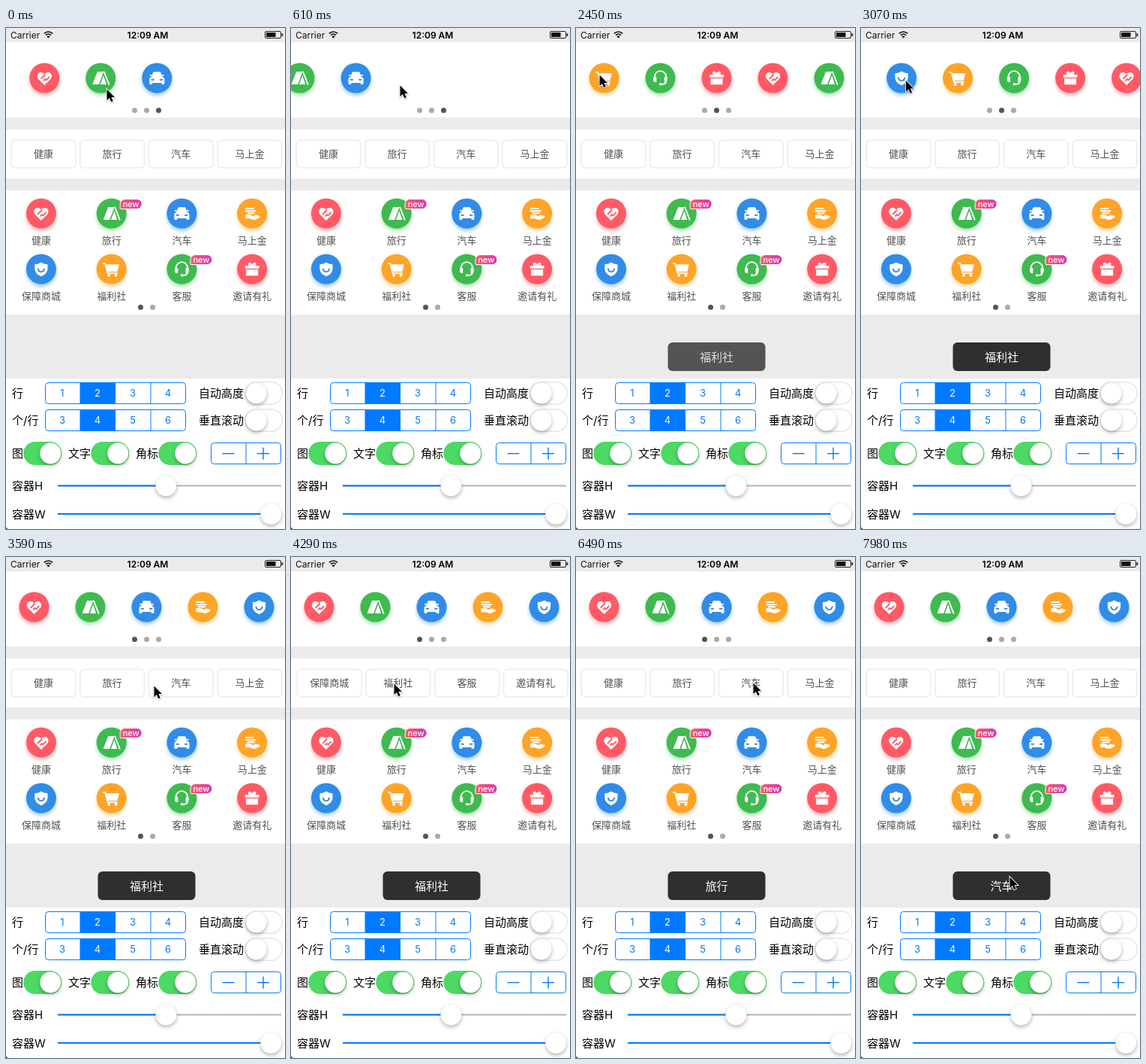
These frames come from a looping animation (372 px wide and 666 px high, 8 s). An HTML page with a canvas:

```html
<!DOCTYPE html>
<html lang="zh">
<head>
<meta charset="utf-8">
<style>
html, body { margin: 0; width: 100%; height: 100%; overflow: hidden; background: #ebebeb; }
canvas { display: block; width: 372px; height: 666px; }
</style>
</head>
<body>
<canvas id="stage"></canvas>
<script>
const W = 372, H = 666, LOOP = 8000, PAGE = 375;
const canvas = document.getElementById('stage');
const dpr = window.devicePixelRatio || 1;
canvas.width = W * dpr;
canvas.height = H * dpr;
const c = canvas.getContext('2d');
const FONT = 'Inter, "Noto Sans CJK SC", "Noto Sans CJK", sans-serif';
const BLUE = '#007aff';
const RED = '#ff5a66', GREEN = '#3fba50', SKY = '#318ce7', ORANGE = '#fda429';

// Each glyph is a list of [path, paint]; paint: w = white fill, k = tint fill, s/t = white/tint stroke
const items = [
  { name: '健康', color: RED, art: [
    ['M0 9.5L-8.3 1.2C-11-2-9.3-7.3-5-7.4C-2.7-7.4-1-6.2 0-4.8C1-6.2 2.7-7.4 5-7.4C9.3-7.3 11-2 8.3 1.2Z', 'w'],
    ['M-4.3 .7L.7-4.2M-1 3.3L.8 1.5L2.5 2.8L6.2-1', 't']] },
  { name: '旅行', color: GREEN, badge: true, art: [
    ['M-11 8.5L-4.4-8.5H3.8L-2.4 8.5Z', 'w'],
    ['M-.6 8.5L3.7-3.5L7.6 8.5Z', 'w'],
    ['M4.6-8L11 8.3', 's']] },
  { name: '汽车', color: SKY, art: [
    ['M-7.2-1.5L-5.2-7.2Q-4.8-8.3-3.6-8.3H3.6Q4.8-8.3 5.2-7.2L7.2-1.5Q10-1 10 1.5V7Q10 8.5 8.5 8.5H7Q6 8.5 6 6.6H-6Q-6 8.5-7 8.5H-8.5Q-10 8.5-10 7V1.5Q-10-1-7.2-1.5Z', 'w'],
    ['M-8.6-3.6H-7.5M7.5-3.6H8.6', 's'],
    ['M-7 2.2H-4.4M4.4 2.2H7', 't']] },
  { name: '马上金', color: ORANGE, art: [
    ['M-8.4-6.5H1.6M-8.4-3.3H4.4M-5.8-.2H2.5', 's'],
    ['M-9 1.4H-3L1.7 3.7Q4 3.3 3.4 1.8L9.7 3.2Q11.4 4.4 9.5 5.7L4.4 8.2Q2.7 8.8 1 8.2L-3.4 6.8H-9Z', 'w']] },
  { name: '保障商城', color: SKY, art: [
    ['M0-9Q3.6-6.4 8.6-6.3V-.3Q8.5 6 0 9.8Q-8.5 6-8.6-.3V-6.3Q-3.6-6.4 0-9Z', 'w'],
    ['M-4.2-.2Q-3.2 3.6 0 3.6Q3.2 3.6 4.2-.2', 't']] },
  { name: '福利社', color: ORANGE, art: [
    ['M-8-6.3H10.2L7.7 3.6H-5.2Z', 'w'],
    ['M-11-7.6H-8.4L-5 5.4H7.6', 's'],
    ['M-5.5 8.3a2 2 0 1 0 4 0a2 2 0 1 0-4 0ZM3.8 8.3a2 2 0 1 0 4 0a2 2 0 1 0-4 0Z', 'w']] },
  { name: '客服', color: GREEN, badge: true, art: [
    ['M-7.6 1V-1.8A7.6 7.6 0 0 1 7.6-1.8V4.3Q7.4 8.2 2 8.4', 's'],
    ['M-9.3-1.5H-5.2V5.4H-7Q-9.3 5.4-9.3 3ZM9.3-1.5H5.2V5.4H7Q9.3 5.4 9.3 3Z', 'w'],
    ['M-1.6 8.3a2 1.7 0 1 0 4 0a2 1.7 0 1 0-4 0Z', 'w']] },
  { name: '邀请有礼', color: RED, art: [
    ['M-9.3-4.6H9.3V-.7H-9.3ZM-8 .4H8V8.7H-8Z', 'w'],
    ['M0-4.6Q-4.8-4.6-4.5-7Q-2.8-9.3 0-4.6Q2.8-9.3 4.5-7Q4.8-4.6 0-4.6', 's']] }
];
for (const it of items) it.art = it.art.map(([d, paint]) => [new Path2D(d), paint]);

// [time, x, y] of the pointer tip
const pointer = [
  [0, 134, 81], [550, 134, 81], [760, 172, 64], [950, 160, 50], [1130, 145, 42],
  [1390, 126, 66], [1480, 122, 64], [1680, 122, 64], [2270, 31, 63], [2450, 31, 62],
  [2800, 36, 64], [3000, 36, 64], [3230, 112, 82], [3590, 197, 171], [3760, 197, 176],
  [3880, 197, 176], [4120, 137, 168], [4740, 137, 168], [4910, 185, 168], [5020, 185, 168],
  [5260, 242, 172], [5880, 140, 167], [6200, 140, 167], [6470, 236, 167], [6940, 236, 167],
  [7360, 231, 327], [7460, 231, 327], [7800, 198, 440], [7890, 198, 440], [7980, 198, 425]
];

const clamp = v => Math.max(0, Math.min(1, v));
const glide = (t, start) => 1 - Math.pow(1 - clamp((t - start) / 460), 3);

function pointerAt(t) {
  let i = 1;
  while (i < pointer.length - 1 && pointer[i][0] < t) i++;
  const [t0, x0, y0] = pointer[i - 1], [t1, x1, y1] = pointer[i];
  const p = clamp((t - t0) / (t1 - t0));
  return [x0 + (x1 - x0) * p, y0 + (y1 - y0) * p];
}

function text(s, x, y, size, color, align = 'center', weight = 400) {
  c.font = `${weight} ${size}px ${FONT}`;
  c.textAlign = align;
  c.fillStyle = color;
  c.fillText(s, x, y + size * 0.37);
}

function rect(x, y, w, h, color) {
  c.fillStyle = color;
  c.fillRect(x, y, w, h);
}

function box(x, y, w, h, r, fill, stroke, line = 1) {
  c.beginPath();
  c.roundRect(x, y, w, h, r);
  if (fill) { c.fillStyle = fill; c.fill(); }
  if (stroke) { c.strokeStyle = stroke; c.lineWidth = line; c.stroke(); }
}

function disc(x, y, r, color) {
  c.beginPath();
  c.arc(x, y, r, 0, Math.PI * 2);
  c.fillStyle = color;
  c.fill();
}

function shadow(color, blur, dy) {
  c.shadowColor = color;
  c.shadowBlur = blur * dpr;
  c.shadowOffsetY = dy * dpr;
}

function icon(it, x, y) {
  if (x < -30 || x > W + 30) return;
  c.save();
  c.translate(x, y);
  c.save();
  shadow(it.color + '77', 5, 3);
  disc(0, 0, 20, it.color);
  c.restore();
  c.lineWidth = 1.9;
  c.lineCap = c.lineJoin = 'round';
  for (const [path, paint] of it.art) {
    if (paint === 'w') {
      c.fillStyle = '#fff';
      c.fill(path);
    } else {
      c.strokeStyle = paint === 's' ? '#fff' : it.color;
      c.stroke(path);
    }
  }
  c.restore();
}

function badge(x, y) {
  const g = c.createLinearGradient(x, 0, x + 29, 0);
  g.addColorStop(0, '#fb5a6c');
  g.addColorStop(1, '#d837b2');
  box(x, y, 29, 13, [6.5, 6.5, 6.5, 1], g, '#fff', 1);
  text('new', x + 14.5, y + 6, 11, '#fff', 'center', 500);
}

function dots(x, y, count, active) {
  for (let i = 0; i < count; i++) disc(x + i * 16, y, 3.5, i === active ? '#555' : '#aaa');
}

function statusBar() {
  text('Carrier', 6, 9.5, 12, '#111', 'left');
  c.strokeStyle = '#111';
  c.lineWidth = 1.7;
  c.lineCap = 'butt';
  for (const r of [4.8, 8]) {
    c.beginPath();
    c.arc(56.5, 13, r, -Math.PI * 0.75, -Math.PI * 0.25);
    c.stroke();
  }
  c.beginPath();
  c.moveTo(56.5, 13.5);
  c.arc(56.5, 13.5, 3, -Math.PI * 0.75, -Math.PI * 0.25);
  c.fillStyle = '#111';
  c.fill();
  text('12:09 AM', 189, 9.5, 12, '#000', 'center', 600);
  box(345.5, 4.5, 21, 9, 1.5, null, '#222');
  rect(347, 6, 12.5, 6, '#111');
  rect(367.5, 7.3, 1.8, 3.6, '#222');
}

function strip(offset) {
  for (let i = 0; i < 11; i++) icon(items[i % 8], 37.5 + i * 75 - offset, 66.5);
  dots(171.5, 109.5, 3, Math.round(offset / PAGE));
}

function cards(offset) {
  items.forEach((it, i) => {
    const x = 49.9 + (i % 4) * 91.7 + Math.floor(i / 4) * PAGE - offset;
    box(x - 42.8, 149.2, 85.6, 36.6, 5, '#fff', '#ececec', 1.6);
    text(it.name, x, 167.5, 13, '#505050');
  });
}

function grid() {
  items.forEach((it, i) => {
    const x = 46.9 + (i % 4) * 93.75, y = 246.5 + Math.floor(i / 4) * 74;
    icon(it, x, y);
    text(it.name, x, y + 35.5, 13, '#505050');
    if (it.badge) badge(x + 11.5, y - 19);
  });
  dots(179.5, 371.3, 2, 0);
}

function segments(y, first) {
  box(52.5, y, 187, 28, 4, '#fff', BLUE);
  rect(98.5, y, 47.5, 28, BLUE);
  rect(192.5, y, 1, 28, BLUE);
  for (let i = 0; i < 4; i++) text(first + i, 75 + i * 47, y + 14, 13, i === 1 ? '#fff' : BLUE);
}

function knob(x, y) {
  c.save();
  shadow('rgba(0,0,0,.28)', 5, 2.5);
  disc(x, y, 14, '#fff');
  c.restore();
  c.beginPath();
  c.arc(x, y, 14, 0, Math.PI * 2);
  c.strokeStyle = 'rgba(0,0,0,.08)';
  c.lineWidth = 0.5;
  c.stroke();
}

function toggle(x, y, on) {
  if (on) box(x, y - 15.5, 51, 31, 15.5, '#4cd964');
  else box(x + 0.75, y - 14.75, 49.5, 29.5, 14.75, '#fff', '#e5e5e5', 1.5);
  knob(x + (on ? 36 : 15.7), y);
}

function slider(y, x) {
  rect(69, y - 1, 298, 2, '#b5b5b5');
  rect(69, y - 1, x - 69, 2, BLUE);
  knob(x, y);
}

function panel() {
  const label = (s, x, y) => text(s, x, y, 15, '#000', 'left');
  label('行', 8, 485.5);
  label('个/行', 8, 521.5);
  segments(471.5, 1);
  segments(507.5, 3);
  label('自动高度', 257, 485.5);
  label('垂直滚动', 257, 521.5);
  toggle(318, 485.5, false);
  toggle(318, 521.5, false);
  ['图', '文字', '角标'].forEach((s, i) => {
    label(s, [8, 83, 173][i], 565.8);
    toggle(23.3 + i * 90, 565.5, true);
  });
  box(273.5, 551.5, 93, 28, 4, '#fff', BLUE);
  rect(319.5, 551.5, 1, 28, BLUE);
  rect(288.5, 565, 16, 1.4, BLUE);
  rect(335, 565, 16, 1.4, BLUE);
  rect(342.3, 557.7, 1.4, 16, BLUE);
  label('容器H', 8, 608.5);
  label('容器W', 8, 646.5);
  slider(608.5, 213.5);
  slider(646, 353.3);
  c.beginPath();
  c.moveTo(0, H - 4);
  c.quadraticCurveTo(0, H, 4, H);
  c.lineTo(0, H);
  c.fillStyle = '#333';
  c.fill();
}

function toast(s, alpha) {
  if (alpha <= 0) return;
  c.save();
  c.globalAlpha = alpha;
  box(122.5, 418, 130, 38, 6, 'rgba(0,0,0,.8)');
  text(s, 187.5, 437.3, 15, '#fff', 'center', 500);
  c.restore();
}

function toasts(t) {
  const fade = start => clamp((t - start) / 250);
  if (t < 5000) toast('福利社', fade(2250) - fade(4430));
  else if (t < 6620) toast('旅行', fade(6150));
  else toast('汽车', fade(6600));
}

const arrow = new Path2D('M0 0V14.6L3.4 11.4L5.7 16.7L8.2 15.6L5.9 10.5H10.4Z');

function cursor(t) {
  if (t > 5060 && t < 5250) return;
  const [x, y] = pointerAt(t);
  c.save();
  c.translate(x + 0.5, y + 0.5);
  shadow('rgba(0,0,0,.3)', 2, 1);
  c.lineJoin = 'miter';
  c.lineWidth = 1.8;
  c.strokeStyle = '#fff';
  c.stroke(arrow);
  c.shadowColor = 'transparent';
  c.fillStyle = '#000';
  c.fill(arrow);
  c.restore();
}

function draw(t) {
  c.setTransform(dpr, 0, 0, dpr, 0, 0);
  rect(0, 0, W, H, '#ebebeb');
  for (const [y, h] of [[19, 100], [135, 65], [216, 165], [466, 200]]) rect(0, y, W, h, '#fff');
  statusBar();
  strip(PAGE * (1 + glide(t, -110) - glide(t, 590) - glide(t, 3030)));
  cards(PAGE * (glide(t, 3900) - glide(t, 5068)));
  grid();
  panel();
  toasts(t);
  cursor(t);
}

const begin = performance.now();
function tick() {
  draw((performance.now() - begin) % LOOP);
  requestAnimationFrame(tick);
}
tick();
</script>
</body>
</html>
```
